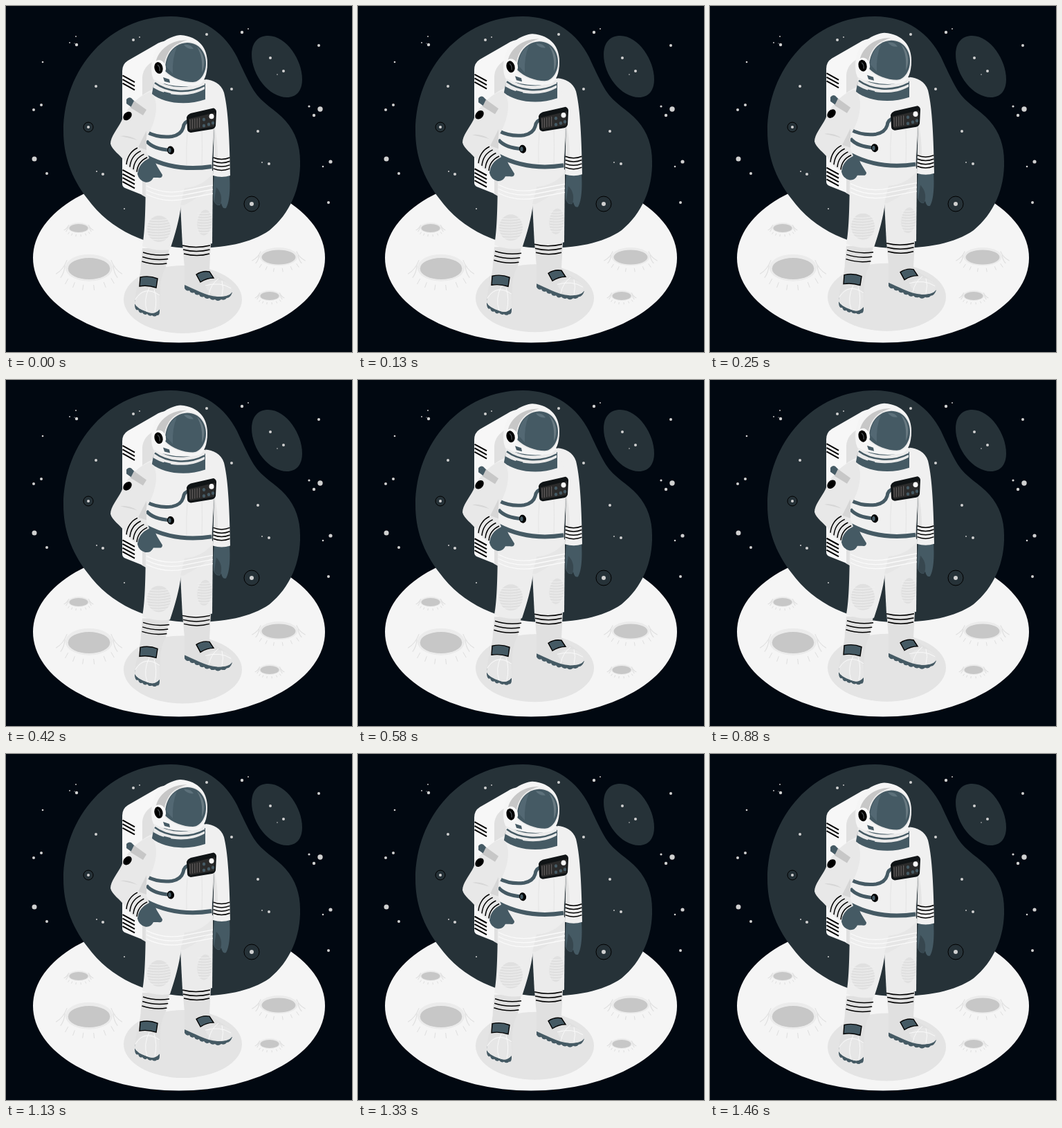
Write an HTML page with a canvas that moves like this. It is 500 px wide and 500 px high and loops after 1.5 s.

```html
<!DOCTYPE html>
<html lang="en">
<head>
<meta charset="utf-8">
<title>Floating astronaut</title>
<style>
html, body { margin: 0; width: 100%; height: 100%; overflow: hidden; background: #010811; }
canvas { display: block; width: 100vmin; height: 100vmin; }
</style>
</head>
<body>
<canvas id="stage" width="500" height="500"></canvas>
<script>
const ctx = document.getElementById('stage').getContext('2d');
const LOOP = 1500, RISE = 10;
const SLATE = '#455a64', NIGHT = '#263238', SUIT = '#f0f0f0', SHADE = '#e0e0e0', WHITE = '#fafafa';

function shape(path, color) {
  ctx.fillStyle = color;
  ctx.fill(new Path2D(path));
}

function line(path, color = '#000', width = 1.5) {
  ctx.strokeStyle = color;
  ctx.lineWidth = width;
  ctx.stroke(new Path2D(path));
}

function oval(x, y, rx, ry, color, turn = 0) {
  ctx.fillStyle = color;
  ctx.beginPath();
  ctx.ellipse(x, y, rx, ry, turn, 0, 2 * Math.PI);
  ctx.fill();
}

function ring(x, y, r) {
  ctx.strokeStyle = '#000';
  ctx.lineWidth = 1;
  ctx.beginPath();
  ctx.arc(x, y, r, 0, 2 * Math.PI);
  ctx.stroke();
}

// x, y, radius
const stars = [
  [101, 44, .9], [92, 53, .9], [99, 54, .6], [102, 56, 2.2], [53, 81, 1.3], [184, 49, 2],
  [193, 45, .9], [290, 41, 2], [341, 38, 2.2], [350, 33, .9], [452, 57, 2], [382, 75, 2],
  [401, 94, 2], [392, 99, .8], [130, 116, 2], [326, 120, 2], [438, 145, 1.6], [454, 149, 3.7],
  [445, 158, 2.2], [40, 150, 2], [51, 143, 2], [364, 181, 2], [119, 175, 2], [41, 221, 3.5],
  [59, 242, 2], [131, 239, 1], [140, 243, 2.1], [171, 293, 1], [370, 226, .9], [380, 228, 2],
  [458, 232, 1.3], [469, 225, 2.6], [466, 284, 2], [355, 286, 3]
];

function crater(x, y, rx, ry) {
  const px = u => x + u * rx, py = v => y + v * ry;
  oval(x, y - ry * .08, rx * 1.13, ry * 1.25, '#ebebeb');
  oval(x, y, rx, ry, '#c7c7c7');
  for (const side of [-1, 1]) {
    line(`M${px(side * 1.05)} ${py(-.8)} Q${px(side * 1.22)} ${py(.1)} ${px(side * 1.58)} ${py(.5)}`, '#e0e0e0', 1.2);
    line(`M${px(side * 1.15)} ${py(-.3)} Q${px(side * 1.18)} ${py(.4)} ${px(side * 1.36)} ${py(.85)}`, '#e0e0e0', 1.2);
  }
  for (const u of [-1, -.68, -.27, .22, .7, 1.05]) {
    const top = 1.55 - .6 * u * u;
    line(`M${px(u)} ${py(top)} L${px(u * 1.14)} ${py(top + .5)}`, '#dedede', 1);
  }
}

function scenery() {
  ctx.fillStyle = '#010811';
  ctx.fillRect(0, 0, 500, 500);
  oval(250, 364, 211, 122.5, '#f5f5f5');
  shape('M238 15 C285 15 317 40 334 74 C341 89 348 105 358 122 C370 141 390 150 404 166 C419 183 425 203 425 224 C426 264 410 300 381 324 C354 343 314 350 270 350 C205 350 150 323 118 279 C93 247 83 214 83 181 C83 90 150 15 238 15Z', NIGHT);
  shape('M379 43 C405 43 428 78 428 106 C428 123 419 132 406 132 C380 132 355 100 355 70 C355 53 364 43 379 43Z', NIGHT);
  for (const [x, y, r] of stars) oval(x, y, r, r, '#d0d0d0');
  ring(119, 175, 7);
  ring(355, 286, 11);
  crater(120, 379.5, 30.3, 15.5);
  crater(394, 363, 24.5, 10.5);
  crater(105, 321, 13.5, 6);
  crater(381, 419, 13.5, 6);
}

function backpack() {
  shape('M180 90 L225 53 L245 60 L230 130 L203 277 L196 273Z', SHADE);
  shape('M168 94 Q168 84 176 79 L216 56 Q223 51 234 50 L216 78 Q198 87 197 103 L197 273 L172 263 Q168 261 168 257Z', '#f7f7f7');
  for (let i = 0; i < 3; i++) line(`M168.500 ${100.5 + i * 5.6} l17.500 9.700`, '#000', 2);
  for (let i = 0; i < 4; i++) line(`M168.500 ${237 + i * 5.6} l17.500 9.500`, '#000', 2);
}

function boots() {
  // Scalloped soles
  shape('M186 425 L186 433 q1 8 5 6 q2 6 6 4 q3 5 7 2 q3 4 7 2 q4 3 7 0 q4 1 4 -6 L222 425Z', SLATE);
  shape('M258 401 v7 q3 5 7 3 q2 5 7 3 q2 5 7 3 q2 5 7 3 q3 5 8 2 q3 4 8 2 q4 4 9 0 q5 2 8 -2 q5 0 8 -8Z', SLATE);
  shape('M197 350 L236 350 L231 377 Q222 393 223 414 L222 438 Q215 447 204 442 Q189 437 186 430 C187 408 195 391 195 373Z', SHADE);
  shape('M255 344 L296 344 L294 380 C300 391 327 398 327 412 Q325 420 306 420 C288 419 271 408 258 403 L258 378Z', SHADE);
  shape('M187 423 C193 407 217 406 222 420 L222 438 Q214 447 204 442 Q189 437 186 430Z', '#e6e6e6');
  shape('M289 407 C294 393 320 392 327 409 Q326 420 306 420 Q294 417 289 407Z', '#e6e6e6');
  line('M204 442 Q198 425 207 407 M215 442 Q219 425 214 409 M187 424 Q200 403 222 418', WHITE, 1);
  line('M293 417 Q296 402 307 394 M312 419 Q315 407 312 397 M325 408 Q310 398 288 404', WHITE, 1);
  const straps = 'M194 392 Q207 389 219 394 L217 407 Q205 403 193 405Z M275 388 Q284 382 294 384 L300 393 Q290 393 281 399Z';
  shape(straps, SLATE);
  line(straps, '#000', 1.4);
}

function legs() {
  boots();
  shape('M250 245 L299 238 L298 343 Q276 351 255 346 L252 288Z', '#ebebeb');
  shape('M202 222 L297 226 L299 250 C287 274 262 279 253 288 C250 310 245 328 237 352 Q216 355 197 347 C201 326 202 290 202 222Z', '#ededed');
  shape('M299 242 Q284 261 258 263 L252 288 L257 288 Q284 274 299 260Z', '#e6e6e6');
  oval(221, 322, 17, 19, SHADE);
  oval(287, 313, 10.5, 18.5, SHADE, .1);
  for (let i = 0; i < 8; i++) {
    line(`M203 ${308 + i * 4} q18 4 35 -1`, '#f0f0f0', 1);
    line(`M277 ${299 + i * 4} q12 2 20 -1`, '#f0f0f0', 1);
  }
  for (let i = 0; i < 3; i++) {
    line(`M203 ${260 + i * 6} Q228 ${273 + i * 6} 258 ${267 + i * 6} T299 ${259 + i * 6}`, WHITE, 1.3);
    line(`M${198 - i * .8} ${356 + i * 6.5} q18 6 ${38 - i} 3`);
    line(`M${255 + i} ${346 + i * 6} q19 5 ${40 - i * 1.5} 0`);
  }
}

function torso() {
  shape('M213 120 C200 126 190 132 186 142 L203 180 L202 222 Q245 239 297 234 L301 175 L301 112 L286 106 Q250 130 213 120Z', SUIT);
  line('M262 184 Q260 205 261 230 M283 181 Q284 205 283 231', '#e4e4e4', 1);
  line('M300 130 Q301 160 297 230', '#dedede', 1);
  line('M203 182 Q220 191 240 188.500 Q253 186 256 176 Q257 167 265 166', SLATE, 5);
  line('M203 195 C210 204 222 207 237 208.500', SLATE, 5);
  oval(238, 208.5, 5, 6, '#000', -.2);
  oval(236.5, 208.5, 2.2, 3.5, SLATE);
  line('M203 218 Q245 240 297 232', SLATE, 6);
}

function chestPanel() {
  shape('M261 161 Q262 157 267 155 L300 147.500 Q304 149 304 153 L303 173 Q302 177 298 178 L267 183 Q262 182 262 178Z', '#101416');
  shape('M264 163 L302 154 L301 174 L266 180Z', '#2b2b2b');
  for (let i = 0; i < 5; i++) line(`M${266 + i * 3.4} ${164 - i * .6} v14`, '#5e5a5a', 1.2);
  for (const [x, y] of [[286, 164], [286, 173], [293, 171], [299, 169]]) oval(x, y, 2.2, 2.5, SLATE);
  oval(297, 159.5, 3.5, 3.8, WHITE);
}

function straightArm() {
  shape('M301 244 Q312 249 323 245 C324 259 324 282 318 292 Q313 294 311 285 L309 288 Q303 289 300 281 Q299 264 301 244Z', SLATE);
  shape('M304 262 Q314 272 310 287 Q303 289 301 281Z', '#37474f');
  shape('M288 106 C299 107 311 112 315 125 C320 145 323 180 324 245 Q312 249 299 245 L301 175 L296 130Z', SUIT);
  shape('M301 171 Q306 195 306 219 L300 219Z', '#e4e4e4');
  for (let i = 0; i < 4; i++) line(`M299.500 ${219 + i * 5.3} q12 5 24 0`);
}

function bentArm() {
  shape('M190 243 Q190 227 207 219 Q214 220 218 231 L226 244 Q226 249 220 248 L213 248 Q209 256 201 254.500 Q192 252 190 243Z', SLATE);
  shape('M208 124 C182 135 172 154 167 166 C161 178 151 189 151 199 C153 208 164 214 173 226 C176 234 186 240 190 242 Q192 227 207 220 L202 207 L191 204 L203 190 Q218 165 217 142 Q215 129 208 124Z', '#e8e8e8');
  shape('M165 188 Q177 186 190 194 Q180 191 165 188 M191 204 L203 180 L203 208Z', '#d6d6d6');
  shape('M174 135 Q177 131 181 133 L187 139 L181 146 L174 141Z', SLATE);
  shape('M185 137 L203 150 L198 158 L180 147Z', '#c7c7c7');
  oval(175.5, 159, 7.2, 5.2, '#000', -.8);
  for (let i = 0; i < 4; i++) {
    line(`M${174 + i * 5} ${229 + i * 3.6} C${175 + i * 5} ${218 + i * 3.6} ${181 + i * 4.8} ${209 + i * 4.6} ${190 + i * 4.7} ${205 + i * 4.6}`);
  }
}

function helmet() {
  shape('M214 112 C212 120 211 126 211 127 C226 140 260 145 288 135 L288 112Z', SLATE);
  shape('M214 104 C232 119 262 122 287 108 L287 120 C265 133 232 130 213 118Z', '#ebebeb');
  line('M215 111 C232 124 263 128 287 115', SLATE, 2.5);
  line('M228 125 l10 2.500', SLATE, 2.5);
  shape('M211 100 C208 80 214 62 226 53 C234 46 246 42 252 42 C280 44 291 62 291 82 C291 100 286 110 279 114 Q243 121 213 106Z', '#f5f5f5');
  shape('M217 79 C221 64 235 53 251 50 L262 49 C244 54 233 66 229 84Z', '#c7c7c7');
  const visor = 'M230 94 C229 75 239 54 262 53 C279 53 289 67 289 83 C289 99 279 110 270 110 C256 110 240 104 230 94Z';
  line(visor, '#ebebeb', 3.5);
  shape(visor, SLATE);
  shape('M276 59 C287 68 289 84 283 96 C284 82 283 70 276 59Z', '#6a7b83');
  shape('M232 88 Q233 67 247 59 Q240 75 241 98Z', '#536873');
  shape('M257 56 Q267 55 271 62 Q262 63 257 56Z', '#5d717b');
  oval(222, 89, 9, 11, WHITE, -.25);
  oval(220.5, 89.5, 6, 8.5, '#000', -.25);
  line('M219 85 q4 3 3 9', '#52585c', 1.2);
  shape('M227 103 L236 106 L237 111 L229 109Z', SLATE);
}

function draw(now) {
  const phase = (now % LOOP) / LOOP;
  const lift = RISE * (1 - Math.abs(1 - 2 * phase));
  scenery();
  ctx.save();
  ctx.translate(0, -lift);
  oval(255.5, 424, 85.5, 49, '#e4e4e4');
  backpack();
  legs();
  torso();
  straightArm();
  chestPanel();
  bentArm();
  helmet();
  ctx.restore();
}

const start = performance.now();
function tick() {
  draw(performance.now() - start);
  requestAnimationFrame(tick);
}
tick();
</script>
</body>
</html>
```
